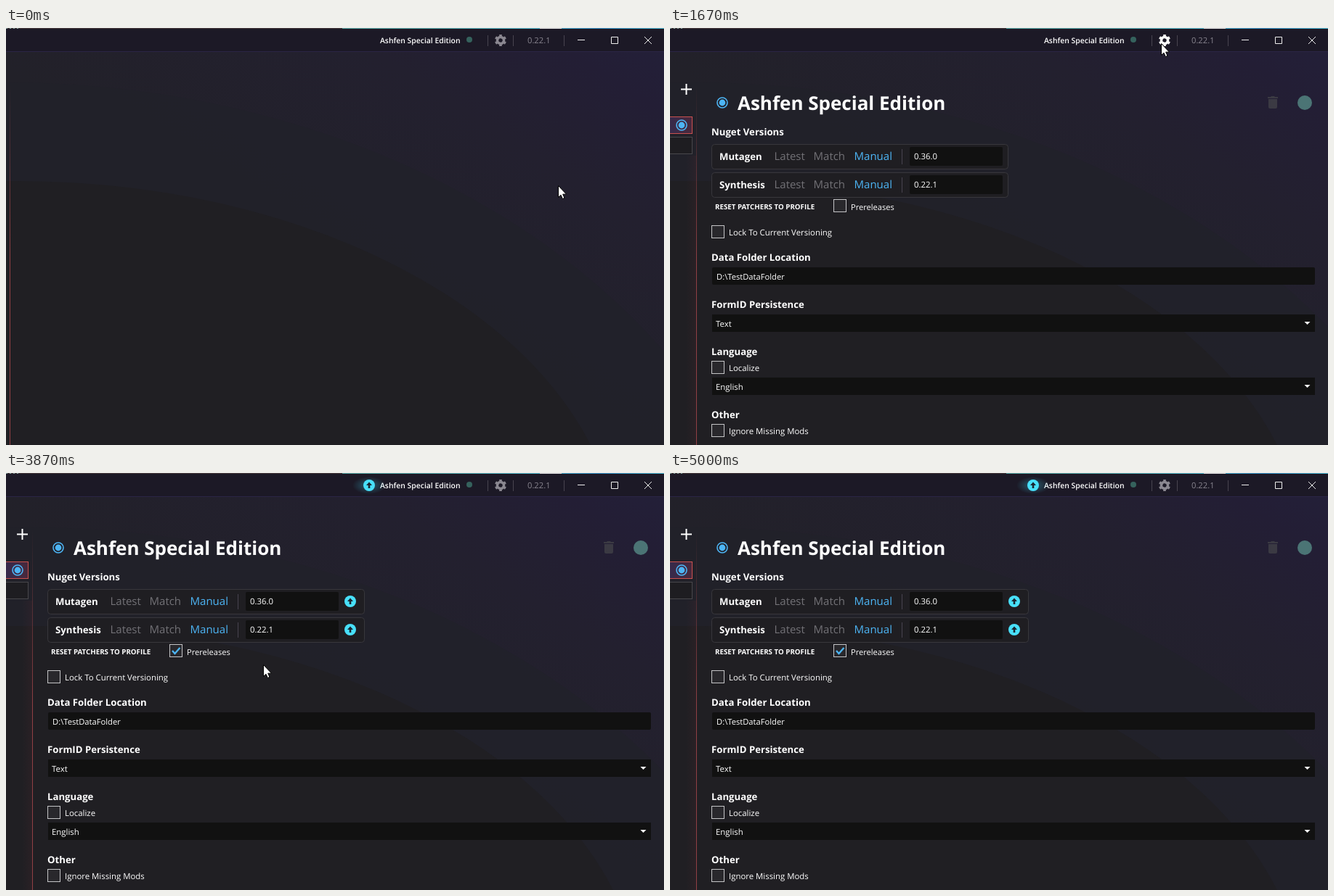
Write an HTML page that moves like this. It is 906 px wide and 575 px high and loops after 5.14 s.

```html
<!DOCTYPE html>
<html lang="en">
<head>
<meta charset="utf-8">
<title>Settings window</title>
<style>
  html, body { margin: 0; width: 100%; height: 100%; overflow: hidden; background: #201f23; }
  svg { display: block; }
  text { font: 11.4px "Open Sans", "Noto Sans", sans-serif; fill: #fff; text-rendering: geometricPrecision; white-space: pre; }
  .head { font-size: 13.2px; font-weight: 700; }
  .mode { font-size: 15px; fill: #727176; }
  .on { fill: #4db5f5; }
  .row { fill: #1f1e22; stroke: #38373c; }
  .field { fill: #111; }
  .check { fill: #29282c; stroke: #c4c4c6; }
  .check.hover { stroke: #77767a; }
  .sep { stroke: #48444f; }
</style>
</head>
<body>
<svg width="906" height="575" viewBox="0 0 906 575">
  <defs>
    <linearGradient id="sky" x1="0" y1="1" x2="1" y2="0">
      <stop offset=".45" stop-color="#222129"/>
      <stop offset=".75" stop-color="#23202f"/>
      <stop offset=".9" stop-color="#231e35"/>
      <stop offset="1" stop-color="#23203a"/>
    </linearGradient>
    <linearGradient id="edge" gradientUnits="userSpaceOnUse" x1="0" y1="77" x2="0" y2="320">
      <stop offset="0" stop-color="#904044" stop-opacity="0"/>
      <stop offset="1" stop-color="#904044"/>
    </linearGradient>
    <linearGradient id="tint">
      <stop offset="0" stop-color="#702c36" stop-opacity="0"/>
      <stop offset="1" stop-color="#702c36" stop-opacity=".12"/>
    </linearGradient>
    <linearGradient id="strip">
      <stop offset="0" stop-color="#5fb0ac"/>
      <stop offset=".3" stop-color="#5fb4b4"/>
      <stop offset=".6" stop-color="#5fc8dc"/>
      <stop offset=".8" stop-color="#3c98d0"/>
      <stop offset="1" stop-color="#55c4dc"/>
    </linearGradient>
    <linearGradient id="picked">
      <stop offset="0" stop-color="#352a4c"/>
      <stop offset="1" stop-color="#49293c"/>
    </linearGradient>
    <radialGradient id="glow">
      <stop offset=".2" stop-color="#3fdcf8" stop-opacity=".28"/>
      <stop offset="1" stop-color="#3fdcf8" stop-opacity="0"/>
    </radialGradient>
    <g id="radio">
      <circle r="7" fill="none" stroke="#4db5f5" stroke-width="1.6"/>
      <circle r="4.4" fill="#4db5f5"/>
    </g>
    <g id="up">
      <circle r="8" fill="#48e0fa"/>
      <path d="M0-4.5 4 0H1.3V4H-1.3V0H-4Z" fill="#1b2530"/>
    </g>
    <path id="arrow" d="M-4-2H4L0 2Z" fill="#fff"/>
  </defs>

  <!-- backdrop -->
  <rect width="906" height="575" fill="url(#sky)"/>
  <g id="shade">
    <ellipse cx="0" cy="910" rx="1090" ry="835" fill="#22212a" opacity=".7"/>
    <path d="M-40 211H15A830 525 0 0 1 845 736H-40Z" fill="#201f23"/>
  </g>

  <!-- title bar -->
  <rect width="906" height="32" fill="#1c1926"/>
  <rect y="32" width="906" height="1" fill="#2b2545"/>
  <rect width="463" height="1" fill="#493d3f"/>
  <path d="M0 .5H20" stroke="#8fb0aa" stroke-dasharray="2 3"/>
  <rect x="463" width="443" height="1" fill="url(#strip)"/>
  <rect x="735" width="30" height="1" fill="#eee"/>
  <text x="515" y="21" style="font-size:10.4px;font-weight:600">Ashfen Special Edition</text>
  <circle cx="638" cy="16" r="4" fill="#35625d"/>
  <path class="sep" d="M663.5 10V25M698.5 10V25M768.5 10V25"/>
  <g id="gear" transform="translate(681 17) rotate(15)" fill="none" stroke="#8b8891">
    <circle r="4.5" stroke-width="3.6"/>
    <circle r="6.8" stroke-width="2.6" pathLength="12" stroke-dasharray="1 1"/>
  </g>
  <text x="718" y="21" style="font-size:11.2px;fill:#88858f">0.22.1</text>
  <path d="M787 16.5H797M833.5 12.5H842.5V21.5H833.5ZM879 12 889 22M889 12 879 22" fill="none" stroke="#eee"/>

  <!-- collapsed side panel -->
  <rect id="home" x="5" y="77" width="1" height="498" fill="url(#edge)"/>

  <g id="page">
    <rect x="22" y="176" width="14" height="399" fill="url(#tint)"/>
    <rect x="36" y="77" width="1" height="498" fill="url(#edge)"/>
    <path d="M15 84.5H30M22.5 77V92" stroke="#fff" stroke-width="2"/>
    <rect x="-2.5" y="122.5" width="33" height="23" fill="url(#picked)" stroke="#c9514f"/>
    <use href="#radio" x="16" y="134"/>
    <rect x="-2.5" y="150.5" width="33" height="23" fill="#1e1d21" stroke="#48474b"/>

    <use href="#radio" x="72" y="103"/>
    <text x="93" y="113" style="font-size:26px;font-weight:700">Ashfen Special Edition</text>
    <path d="M824 98H836V109Q836 111 834 111H826Q824 111 824 109ZM823 95H827L828 94H832L833 95H837V97H823Z" fill="#3b3a43"/>
    <circle cx="874" cy="103" r="10" fill="#4b7475"/>

    <text class="head" x="57" y="148">Nuget Versions</text>
    <rect class="row wide" x="57.5" y="160.5" width="408" height="34" rx="4"/>
    <rect class="row wide" x="57.5" y="199.5" width="408" height="34" rx="4"/>
    <g id="versions"></g>
    <text x="62" y="250" style="font-size:9.75px;font-weight:700">RESET PATCHERS TO PROFILE</text>
    <rect class="check" id="pre" x="225.5" y="236.5" width="17" height="17"/>
    <text x="249" y="251" style="font-size:11.1px">Prereleases</text>
    <rect class="check" x="57.5" y="272.5" width="17" height="17"/>
    <text x="81" y="286">Lock To Current Versioning</text>

    <text class="head" x="57" y="321">Data Folder Location</text>
    <rect class="field" x="58" y="330" width="830" height="24" rx="2"/>
    <text x="64" y="347" style="font-size:11.2px">D:\TestDataFolder</text>

    <text class="head" x="57" y="386">FormID Persistence</text>
    <rect class="field" x="58" y="395" width="830" height="24"/>
    <rect id="lit" x="57.5" y="394.5" width="831" height="25" fill="#5b5a5d" stroke="#858487"/>
    <text x="63" y="412">Text</text>
    <use href="#arrow" x="877.5" y="407"/>

    <text class="head" x="57" y="451">Language</text>
    <rect class="check" x="57.5" y="459.5" width="17" height="17"/>
    <text x="81" y="473">Localize</text>
    <rect class="field" x="58" y="482" width="830" height="24"/>
    <text x="63" y="499">English</text>
    <use href="#arrow" x="877.5" y="494"/>

    <text class="head" x="57" y="538">Other</text>
    <rect class="check" x="57.5" y="546.5" width="17" height="17"/>
    <text x="81" y="560">Ignore Missing Mods</text>
  </g>

  <g id="updates">
    <path d="M229 245 232.5 249 239.5 241" fill="none" stroke="#4db5f5" stroke-width="2.4"/>
    <ellipse cx="500" cy="17" rx="23" ry="12" fill="url(#glow)"/>
    <use href="#up" x="500" y="17"/>
    <use href="#up" x="474" y="177"/>
    <use href="#up" x="474" y="216"/>
  </g>

  <path id="cursor" d="M.5 .5V16.5L4 13.3 6.4 18.5 9 17.4 6.7 12.2H11.5Z" fill="#fff" stroke="#000"/>
</svg>
<script>
const LOOP = 5140, TICK = 1000 / 15;
const el = id => document.getElementById(id);
const show = (id, on) => el(id).style.display = on ? '' : 'none';
const move = (id, x, y) => el(id).setAttribute('transform', `translate(${x} ${y})`);

el('versions').innerHTML = [['Mutagen', '0.36.0', 182], ['Synthesis', '0.22.1', 221]].map(([name, version, y]) => `
  <text class="head" x="68" y="${y}">${name}</text>
  <text class="mode" x="143.5" y="${y}">Latest</text>
  <text class="mode" x="197.5" y="${y}">Match</text>
  <text class="mode on" x="253.5" y="${y}">Manual</text>
  <path class="sep" d="M319.5 ${y - 15}v21"/>
  <rect class="field" x="330" y="${y - 18}" width="128" height="26" rx="2"/>
  <text x="336" y="${y - 1}">${version}</text>`).join('');

// Pointer path: tick, x, y
const path = [
  [0, 760, 217], [5, 742, 321], [7, 742, 321], [12, 688, 110], [15, 701, 18],
  [18, 676, 21], [27, 676, 21], [29, 625, 55], [32, 400, 215], [34, 300, 269],
  [35, 274, 259], [42, 242, 247], [48, 242, 247], [52, 350, 261], [57, 350, 261],
  [58, 354, 264], [60, 358, 302], [62, 373, 406], [63, 380, 523]
];

function pointAt(k) {
  const i = path.findIndex(p => p[0] > k);
  if (i < 0) return path.at(-1).slice(1);
  const [k0, x0, y0] = path[i - 1], [k1, x1, y1] = path[i];
  const f = (k - k0) / (k1 - k0);
  return [x0 + (x1 - x0) * f, y0 + (y1 - y0) * f].map(Math.round);
}

function draw(now) {
  // The screen refreshes 15 times a second
  const k = Math.floor((now % LOOP + 4) / TICK);
  const [x, y] = pointAt(k), open = k >= 25, updated = k >= 45;
  show('home', !open);
  show('page', open);
  show('updates', updated);
  show('cursor', k < 64);
  show('lit', k < 64 && y >= 394 && y < 420);
  move('cursor', x, y);
  move('shade', open ? 31 : 0, 0);
  el('gear').setAttribute('stroke', k >= 16 && k < 28 ? '#fff' : '#8b8891');
  el('pre').classList.toggle('hover', k >= 38 && k < 49);
  for (const row of document.querySelectorAll('.wide')) row.setAttribute('width', updated ? 436 : 408);
}

const start = performance.now();
function loop() {
  draw(performance.now() - start);
  requestAnimationFrame(loop);
}
loop();
</script>
</body>
</html>
```
